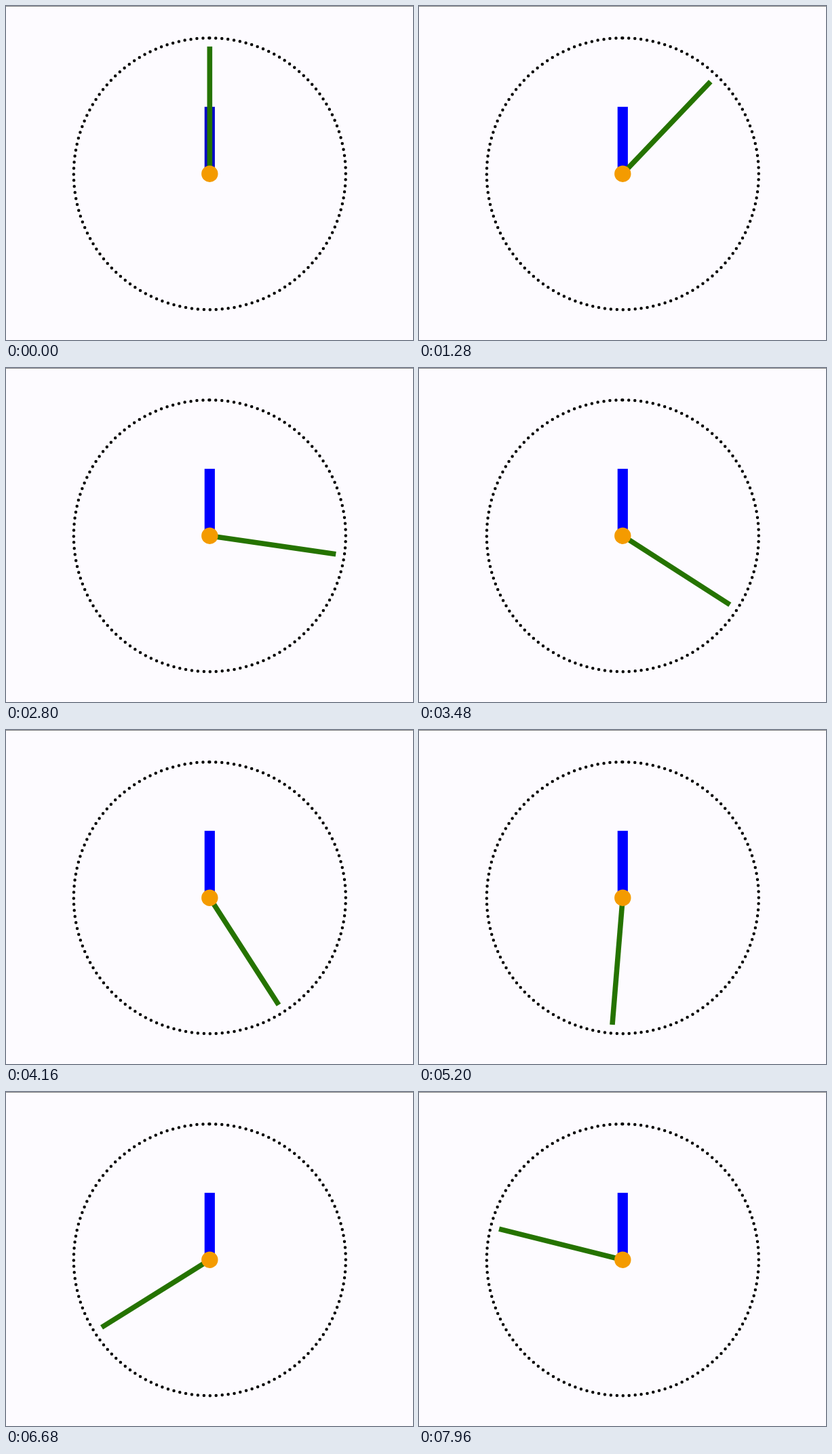
An HTML page that plays this animation: 600x493 px, repeating every 8 s.

```html
<!DOCTYPE html>
<html lang="en">
<head>
<meta charset="utf-8">
<title>Clock</title>
<style>
  html, body { margin: 0; height: 100%; overflow: hidden; background: #fdfbff; }
  svg { display: block; width: 100%; height: 100%; }
</style>
</head>
<body>
<svg viewBox="0 0 600 493">
  <rect width="600" height="1" fill="#858585"/>
  <g transform="translate(300.3 247.7)">
    <path d="M0-200.5A200.5 200.5 0 0 1 0 200.5A200.5 200.5 0 0 1 0-200.5"
      fill="none" stroke="#000" stroke-width="4.5" stroke-linecap="round" stroke-dasharray="0 8.988"/>
    <rect id="hour" x="-7.6" y="-98.9" width="15.2" height="98.9"/>
    <rect id="minute" x="-3.8" y="-187.9" width="7.6" height="187.9" fill="#257300"/>
    <circle r="12.2" fill="#f49b00"/>
  </g>
</svg>
<script>
  const LOOP = 8000, STEP = 40, HOLD = 80, REVOLUTION = 10000, LEAD = 10;
  const hour = document.getElementById('hour');
  const minute = document.getElementById('minute');

  function draw(now) {
    const time = Math.floor(now % LOOP / STEP) * STEP;
    const resting = time < HOLD;
    const angle = resting ? 0 : (time - HOLD + LEAD) / REVOLUTION * 360;
    minute.setAttribute('transform', `rotate(${angle})`);
    hour.setAttribute('fill', resting ? '#0606c8' : '#0000ff');
  }

  const start = performance.now();
  function tick() {
    draw(performance.now() - start);
    requestAnimationFrame(tick);
  }
  tick();
</script>
</body>
</html>
```
